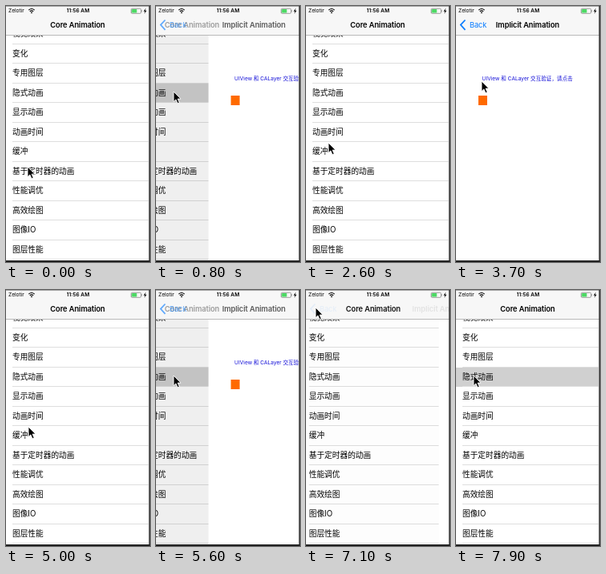
Write an HTML page that moves like this. It is 180 by 320 pixels and loops after 8 s.

```html
<!DOCTYPE html>
<html lang="zh-CN">
<head>
<meta charset="utf-8">
<title>Core Animation</title>
<style>
html, body { margin: 0; width: 100%; height: 100%; overflow: hidden; background: #fff; }
#stage { position: relative; width: 180px; height: 320px; overflow: hidden; background: #fff;
  font-family: Inter, "Noto Sans CJK SC", "Noto Sans CJK", sans-serif; color: #000; }
#stage div, #stage svg { position: absolute; white-space: nowrap; }
.page { left: 0; top: 0; width: 180px; height: 320px; background: #fff; overflow: hidden; }
.row { left: 0; width: 178px; height: 24.5px; padding-left: 8px; box-sizing: border-box;
  font-size: 9.7px; line-height: 24.5px; }
.row::after { content: ""; position: absolute; left: 8px; right: 0; bottom: 0; height: 1px; background: #dedede; }
#shade { inset: 0; background: #000; }
#label { left: 32.5px; top: 85px; line-height: 12px; font-size: 6.6px; color: #1410d8; }
#square { left: 27.5px; top: 112px; width: 11.5px; height: 12px; background: #ff6a00; }
#bar { left: 0; top: 0; width: 180px; height: 36px; background: #f7f7f7; border-bottom: 1px solid #b9b9b9; overflow: hidden; }
.title { left: 0; width: 179px; top: 17px; line-height: 14px; text-align: center;
  font-size: 9.4px; font-weight: 600; letter-spacing: -.12px; }
#back { left: 0; top: 0; width: 50px; height: 36px; color: #087cff; }
#back div { left: 17px; top: 17px; line-height: 14px; font-size: 9.4px; letter-spacing: -.15px; }
.status { top: 2px; line-height: 9px; font-size: 6.6px; }
#clock { left: 0; width: 180px; text-align: center; font-weight: 600; }
</style>
</head>
<body>
<div id="stage">
  <div class="page" id="list"></div>
  <div class="page" id="detail">
    <div id="label">UIView 和 CALayer 交互验证，请点击</div>
    <div id="square"></div>
  </div>
  <div id="bar">
    <div class="title" id="listTitle">Core Animation</div>
    <div class="title" id="detailTitle">Implicit Animation</div>
    <div id="back">
      <svg width="16" height="36" fill="none" stroke="#087cff" stroke-width="1.7"><path d="M11.5 17.5 5.8 23.6 11.5 29.8"/></svg>
      <div>Back</div>
    </div>
    <div class="status" style="left:3px">Zelotir</div>
    <div class="status" id="clock">11:56 AM</div>
    <svg width="180" height="12" fill="none" stroke="#000" stroke-width="1.2">
      <path d="M28.3 5.1Q32 1.9 35.7 5.1M29.8 6.9Q32 5 34.2 6.9"/>
      <path d="M30.8 8 32 9.4 33.2 8Q32 7.1 30.8 8Z" fill="#000" stroke="none"/>
      <rect x="156.4" y="3.3" width="12.4" height="6" rx="1.2" stroke="#777" stroke-width=".7"/>
      <rect x="157.2" y="4.1" width="6.3" height="4.4" rx=".5" fill="#4cd964" stroke="none"/>
      <path d="M169.6 5.3v2" stroke="#777" stroke-width=".8"/>
      <path d="M174.7 2.8 172 6.7h1.8l-.8 3.1 2.8-4h-1.8Z" fill="#000" stroke="none"/>
    </svg>
  </div>
  <svg width="180" height="320">
    <path d="M0 .4H180" stroke="#8a8a8a" stroke-width=".8"/>
    <path d="M179.3 0V320" stroke="#333" stroke-width="1.4"/>
    <path d="M0 319H180" stroke="#222" stroke-width="2"/>
  </svg>
  <svg id="cursor" width="14" height="18" style="left:0;top:0;overflow:visible">
    <path d="M0 0V12.6L2.9 9.9 5 14.7 7.2 13.7 5.1 9.1H9Z" fill="#000" stroke="#fff" stroke-width=".9"/>
  </svg>
</div>
<script>
const $ = id => document.getElementById(id);
const LOOP = 8000, CYCLE = 2400, STEP = 100;
const PUSH = 700, POP = 2100, SLIDE = 350;
const ROWS = ["视觉效果", "变化", "专用图层", "隐式动画", "显示动画", "动画时间", "缓冲",
  "基于定时器的动画", "性能调优", "高效绘图", "图像IO", "图层性能"];
// time, x, y of the pointer tip
const PATH = [[0, 27, 201], [200, 28, 171], [400, 26, 135], [600, 22, 107], [1100, 22, 107],
  [1200, 25, 104], [1300, 32, 94], [1500, 29, 76], [1900, 12, 22], [CYCLE, 12, 22]];

const rows = ROWS.map((text, i) => {
  const row = document.createElement("div");
  row.className = "row";
  row.textContent = text;
  row.style.top = 23.25 + 24.5 * i + "px";
  $("list").append(row);
  return row;
});
const shade = document.createElement("div");
shade.id = "shade";
$("list").append(shade);

const clamp = v => Math.min(1, Math.max(0, v));
const ease = v => 1 - (1 - clamp(v)) ** 3;
const shift = (el, x, y = 0) => el.style.transform = `translate(${x}px, ${y}px)`;

function pointer(t) {
  const i = PATH.findIndex(p => p[0] > t);
  const [t0, x0, y0] = PATH[i - 1], [t1, x1, y1] = PATH[i];
  const k = (t - t0) / (t1 - t0);
  return [x0 + (x1 - x0) * k, y0 + (y1 - y0) * k];
}

function draw(time) {
  const t = Math.floor(time % LOOP / STEP) * STEP % CYCLE;
  const p = ease((t - PUSH) / SLIDE) - ease((t - POP) / SLIDE);
  shift($("list"), -54 * p);
  shift($("detail"), 180 * (1 - p));
  shade.style.opacity = .1 * p;
  rows[3].style.background = t >= PUSH && t < POP ? "#d0d0d0" : "";
  shift($("listTitle"), -70 * p);
  $("listTitle").style.opacity = 1 - p;
  shift($("detailTitle"), 90 * (1 - p));
  $("detailTitle").style.opacity = p;
  $("back").style.opacity = t === POP ? .35 : p;
  shift($("cursor"), ...pointer(t));
}

const start = performance.now();
function tick() {
  draw(performance.now() - start);
  requestAnimationFrame(tick);
}
tick();
</script>
</body>
</html>
```
